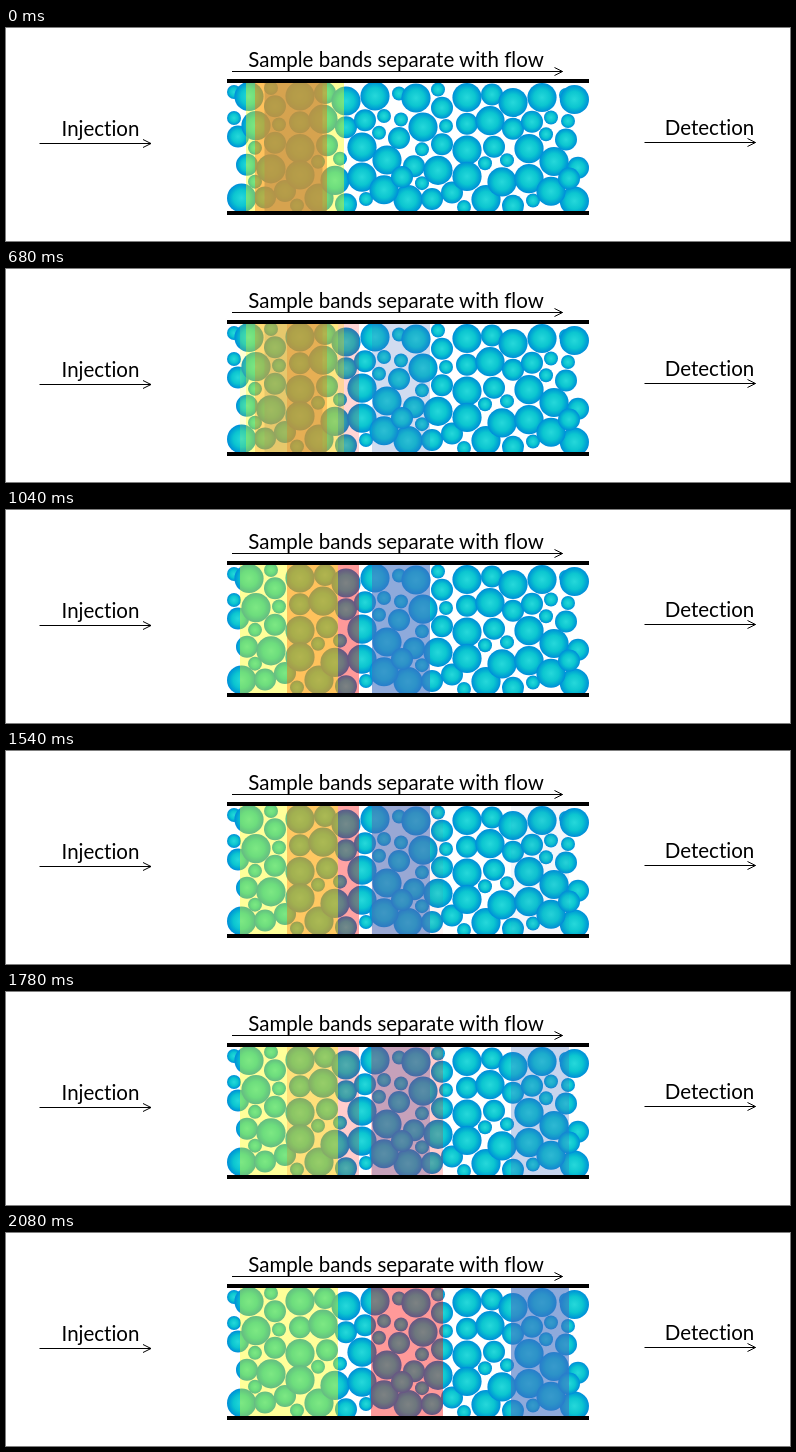
These frames come from a looping animation (784 px wide and 213 px high, 2.58 s). An HTML page:

```html
<!DOCTYPE html>
<html lang="en">
<head>
<meta charset="utf-8">
<title>Sample bands separate with flow</title>
<style>
  html, body { margin: 0; width: 100%; height: 100%; overflow: hidden; background: #fff; }
  svg { display: block; width: 784px; height: 213px; }
  text {
    font: 20.5px Lato, "Open Sans", sans-serif;
    font-variant-ligatures: none;
    text-anchor: middle;
  }
  .arrow { fill: none; stroke: #000; stroke-width: 1; }
  .wall { stroke: #000; stroke-width: 4; }
  .blue { fill: #4472c4; fill-opacity: .6; }
  .red { fill: #f00; fill-opacity: .4; }
  .yellow { fill: #ff0; fill-opacity: .4; }

  /* each stage fades in over the previous one in nine 60 ms steps */
  #middle { animation: middle 2580ms infinite; }
  #end { animation: end 2580ms infinite; }
  @keyframes middle {
    0% { opacity: 0; animation-timing-function: step-end; }
    19.3798% { opacity: .1; animation-timing-function: steps(9, end); }
    40.31%, 100% { opacity: 1; }
  }
  @keyframes end {
    0% { opacity: 0; animation-timing-function: step-end; }
    59.6899% { opacity: .1; animation-timing-function: steps(9, end); }
    80.6201%, 100% { opacity: 1; }
  }
</style>
</head>
<body>
<svg viewBox="0 0 784 213">
  <defs>
    <radialGradient id="shade">
      <stop offset="0" stop-color="#26d8da"/>
      <stop offset=".55" stop-color="#0cc6d0"/>
      <stop offset=".8" stop-color="#02a8d3"/>
      <stop offset="1" stop-color="#008cda"/>
    </radialGradient>
    <clipPath id="inside"><rect x="220" y="53" width="364" height="132"/></clipPath>
    <g id="column" clip-path="url(#inside)">
      <rect x="220" y="53" width="364" height="132" fill="#fff"/>
      <g id="beads" fill="url(#shade)"></g>
    </g>
  </defs>

  <g id="start"></g>
  <g id="middle"></g>
  <g id="end"></g>

  <path class="wall" d="M221 53H583M221 185H583"/>
  <path class="arrow" d="M226 43.5H556.5m-8-4l8 4l-8 4"/>
  <path class="arrow" d="M33.5 115.5H145m-8-4l8 4l-8 4"/>
  <path class="arrow" d="M638.5 114.5H749.5m-8-4l8 4l-8 4"/>
  <text x="390" y="39">Sample bands separate with flow</text>
  <text x="94.5" y="108">Injection</text>
  <text x="703.5" y="107">Detection</text>
</svg>
<script>
  const SVG = 'http://www.w3.org/2000/svg';
  const LEFT = 221, RIGHT = 583;
  const REPEAT = { x: 167, y: 1.5 };
  const RADIUS = { S: 7, M: 11, L: 14.6 };
  const GAP = 0.7;
  const byId = id => document.getElementById(id);

  function add(parent, tag, attrs) {
    const node = document.createElementNS(SVG, tag);
    for (const key in attrs) node.setAttribute(key, attrs[key]);
    parent.append(node);
  }

  // the packing repeats along the column; beads at the ends stay inside
  function addBead(x, y, r) {
    for (let i = 0; i < 3; i++) {
      const cx = x + i * REPEAT.x;
      if (cx > RIGHT - 5) break;
      add(byId('beads'), 'circle', {
        cx: Math.min(Math.max(cx, LEFT + r), RIGHT - r), cy: y + i * REPEAT.y, r
      });
    }
  }

  // every bead touches the one above it, so its height follows from x
  function stack(top, sizes, ...xs) {
    let y = top;
    xs.forEach((x, i) => {
      const r = RADIUS[sizes[i]];
      if (i) {
        const reach = r + RADIUS[sizes[i - 1]] + GAP;
        y += Math.sqrt(reach ** 2 - (x - xs[i - 1]) ** 2);
      }
      addBead(x, y, r);
    });
  }

  // bands are given by their left edges
  function addStage(id, blue, red, yellow) {
    const stage = byId(id);
    const band = (name, x, width) =>
      add(stage, 'rect', { class: name, x, y: 54, width, height: 130 });
    add(stage, 'use', { href: '#column' });
    band('blue', blue, 58);
    band('red', red, 72);
    band('yellow', yellow, 98);
  }

  stack(64, 'S', 226);
  stack(90, 'SM', 228, 226);
  stack(170, 'L', 235);
  stack(68.5, 'LLSMSM', 243, 250, 249, 241, 249, 259);
  stack(60, 'SMSMLMS', 265, 269, 273, 269, 265, 279, 291);
  stack(68, 'LMLSLL', 294, 294, 294, 312, 294, 313);
  stack(65, 'MLMSLM', 319, 317, 321, 334, 329, 340);
  stack(73, 'LM', 340, 340);
  stack(68, 'LMSLLS', 369, 359, 373, 356, 356, 360);
  stack(88, 'S', 378);
  stack(132, 'LL', 381, 378);
  stack(149, 'M', 396);

  addStage('start', 258.5, 249, 240);
  addStage('middle', 366, 281, 234);
  addStage('end', 505, 365, 234);
</script>
</body>
</html>
```
